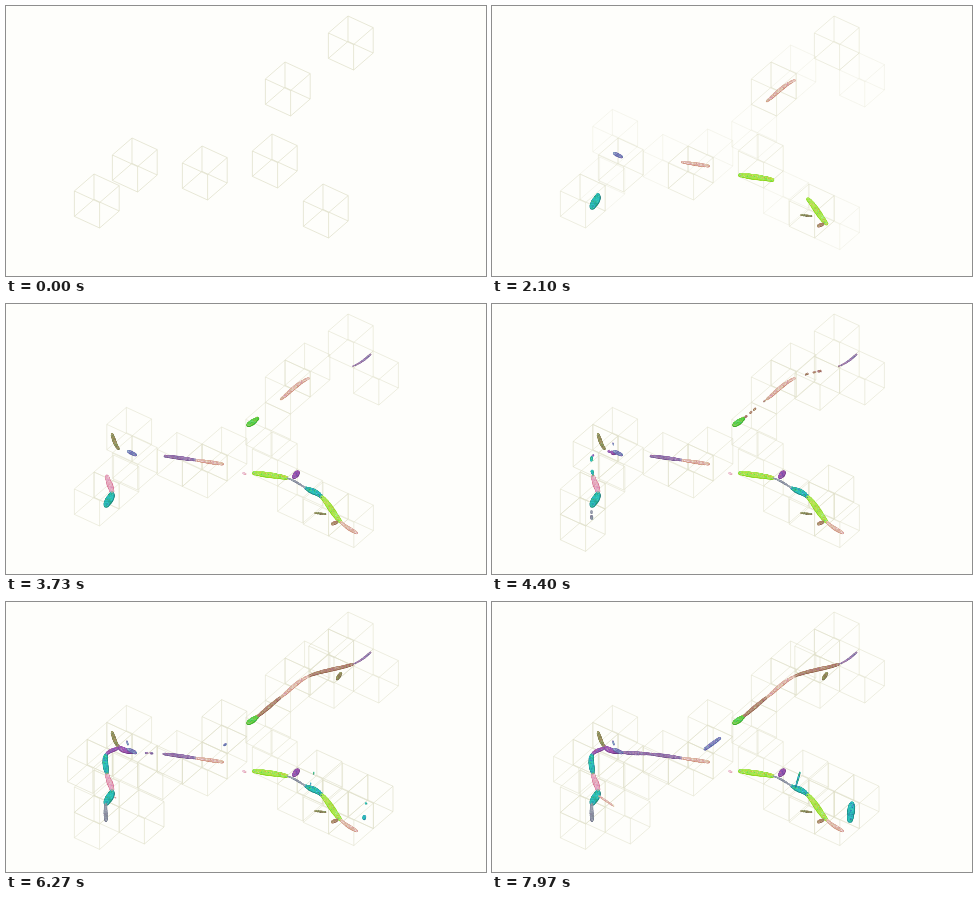
An HTML page with a canvas for the animation above (8000 ms loop, 480 by 270 pixels).

```html
<!DOCTYPE html>
<html lang="en">
<head>
<meta charset="utf-8">
<title>Growing segments</title>
<style>
  html, body { margin: 0; width: 100%; height: 100%; overflow: hidden; background: #fefefb; }
  canvas { display: block; width: 480px; height: 270px; }
</style>
</head>
<body>
<canvas id="stage" width="480" height="270"></canvas>
<script>
const LOOP = 8000, STEP = 2000;
const ctx = document.getElementById('stage').getContext('2d');

// Projected cube edges; a capital letter walks the edge backwards.
const edges = { a: [-19.6, 17], b: [25.2, 11.6], c: [0, 25.4] };

// Seed cube, then the walks to the cubes added in steps 1, 2 and 3.
const seeds = [
  [342, 10, 'bc', 'ac', 'a'],
  [279, 56, 'A ac'],
  [126, 132, 'AB', 'B', 'aB b'],
  [88, 168, 'A', 'c', 'Abc'],
  [196, 140, 'A B', '', 'AC'],
  [266, 128, 'bc', '', 'Abc'],
  [317, 178, 'b', 'A', 'Ab']
];

const palette = {
  green: [110, 60, 53], lime: [84, 76, 58], teal: [178, 62, 43], purple: [275, 26, 54],
  violet: [285, 38, 50], blue: [235, 32, 58], pink: [340, 55, 75], tan: [15, 45, 73],
  brown: [20, 30, 54], olive: [55, 25, 46], grey: [225, 12, 58]
};

// Key points; each span between two of them has a step, a girth and a colour.
const strands = [
  ['242,121 252,114 275,95 303,74 347,62 365,50', '12021', '32221', 'green brown tan brown purple grey'],
  ['106,130 113,145 129,150 159,152 190,156 217,160', '12310', '23222', 'olive violet purple purple tan'],
  ['112,146 100,153 101,172 106,189 100,202 100,219', '22102', '23342', 'violet teal pink teal grey'],
  ['248,169 281,174 300,184 316,193 335,218 351,229', '01101', '31332', 'lime grey teal lime tan'],
  ['122,147 130,151', '0', '2', 'blue'],
  ['326,220 331,218', '0', '2', 'brown'],
  ['309,209 320,210', '0', '1', 'olive'],
  ['288,173 292,168', '1', '3', 'violet'],
  ['237,169 240,170', '1', '1', 'pink'],
  ['331,77 335,71', '2', '2', 'olive'],
  ['121,139 122,143', '2', '1', 'blue'],
  ['213,147 228,136', '3', '2', 'blue'],
  ['358,218 360,201', '3', '4', 'teal'],
  ['304,184 308,170', '3', '1', 'teal'],
  ['107,194 122,204', '3', '1', 'tan']
];

let seed = 17;
const random = () => (seed = seed * 16807 % 2147483647) / 2147483647;
const jitter = size => (random() - 0.5) * size;
const clamp = x => Math.max(0, Math.min(1, x));
const spline = (a, b, c, d, t) => b + t * (c - a + t * (2 * a - 5 * b + 4 * c - d + t * (3 * b - a - 3 * c + d))) / 2;
const hsl = (h, s, l) => `hsl(${h} ${s}% ${l}%)`;

function walk(x, y, moves) {
  for (const move of moves) {
    const [dx, dy] = edges[move.toLowerCase()];
    const sign = move === move.toLowerCase() ? 1 : -1;
    x += sign * dx;
    y += sign * dy;
  }
  return [x, y];
}

const cubes = seeds.flatMap(([x, y, ...steps]) => [
  { x, y, birth: 0 },
  ...steps.flatMap((walks, i) => walks.split(' ').filter(Boolean).map(moves => {
    const [cx, cy] = walk(x, y, moves);
    return { x: cx, y: cy, birth: (i + 1) * STEP };
  }))
]);

// Each span becomes a row of beads that sprout in small random clumps.
function makeBeads([path, steps, girths, colours]) {
  const points = path.split(' ').map(p => p.split(',').map(Number));
  const names = colours.split(' ');
  const at = i => points[Math.max(0, Math.min(points.length - 1, i))];
  return [...steps].flatMap((step, i) => {
    const [hue, sat, light] = palette[names[i]];
    const [p, q] = [points[i], points[i + 1]];
    const count = Math.ceil(Math.hypot(q[0] - p[0], q[1] - p[1]) / 0.6);
    let birth;
    return Array.from({ length: count }, (_, k) => {
      if (k % 4 === 0) birth = step * STEP + 150 + random() * 700;
      const t = k / count;
      const [x, y] = [0, 1].map(n => spline(at(i - 1)[n], p[n], q[n], at(i + 2)[n], t));
      const r = girths[i] * (0.55 + 0.35 * Math.sin(Math.PI * t) + jitter(0.16));
      const tone = light + jitter(8);
      return {
        x, y, r, birth,
        dark: hsl(hue, sat, tone - 10),
        body: hsl(hue, sat, tone + 2),
        fleck: hsl(hue + jitter(140), sat, tone + 6 + jitter(24)),
        fx: x + jitter(r * 1.2),
        fy: y + jitter(r * 1.2)
      };
    });
  });
}

const strandBeads = strands.map(makeBeads);

function dot(x, y, r, colour) {
  ctx.fillStyle = colour;
  ctx.beginPath();
  ctx.arc(x, y, r, 0, Math.PI * 2);
  ctx.fill();
}

function drawCube({ x, y, birth }, time) {
  const age = time - birth;
  if (age < 0) return;
  const corner = (a, b, c) => [0, 1].map(n => [x, y][n] + a * edges.a[n] + b * edges.b[n] + c * edges.c[n]);
  ctx.globalAlpha = (birth ? clamp(age / 250) : 1) * (1 - 0.25 * clamp(age / 800));
  ctx.beginPath();
  for (const i of [0, 1]) for (const j of [0, 1]) {
    for (const edge of [n => [n, i, j], n => [i, n, j], n => [i, j, n]]) {
      ctx.moveTo(...corner(...edge(0)));
      ctx.lineTo(...corner(...edge(1)));
    }
  }
  ctx.stroke();
}

function drawStrand(beads, time) {
  const grown = beads.filter(b => time > b.birth);
  const size = b => b.r * (0.4 + 0.6 * clamp((time - b.birth) / 400));
  for (const b of grown) dot(b.x, b.y + 0.2, size(b), b.dark);
  for (const b of grown) dot(b.x - 0.15, b.y - 0.2, size(b) * 0.8, b.body);
  for (const b of grown) dot(b.fx, b.fy, 0.5, b.fleck);
}

function draw(time) {
  ctx.globalAlpha = 1;
  ctx.fillStyle = '#fefefb';
  ctx.fillRect(0, 0, 480, 270);
  ctx.strokeStyle = '#dedec8';
  ctx.lineWidth = 0.7;
  for (const cube of cubes) drawCube(cube, time);
  ctx.globalAlpha = 1;
  for (const beads of strandBeads) drawStrand(beads, time);
}

const start = performance.now();
function tick() {
  draw((performance.now() - start) % LOOP);
  requestAnimationFrame(tick);
}
tick();
</script>
</body>
</html>
```
